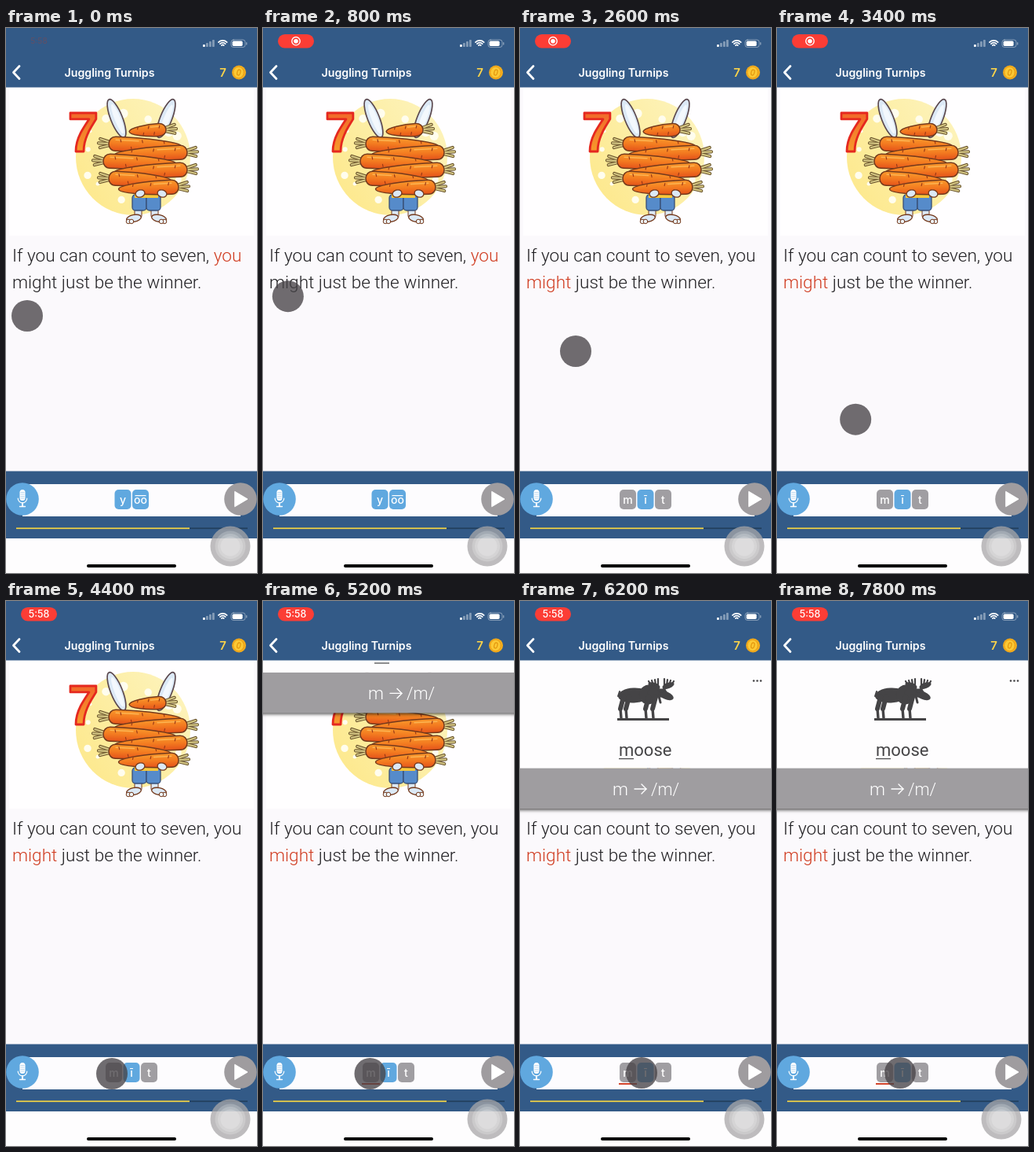
Write an HTML page with a canvas that moves like this. It is 320 by 693 pixels and loops after 8 s.

```html
<!DOCTYPE html>
<html lang="en">
<head>
<meta charset="utf-8">
<title>Reading lesson</title>
<style>
html, body { margin: 0; width: 100%; height: 100%; overflow: hidden; background: #fbf9fc; }
canvas { display: block; width: 320px; height: 693px; }
</style>
</head>
<body>
<canvas id="stage"></canvas>
<script>
const W = 320, H = 693, LOOP = 8000, STEP = 200;
const HIGHLIGHT = 1600, CLOCK = 3600, PANEL = 5100;
const BLUE = '#335a87', SKY = '#60a8df', GREY = '#a09ea2', INK = '#201f22', RED = '#d03c20';
const LINE = '#74391c', FUR = '#dce9f6', DARK = '#454446';
const canvas = document.getElementById('stage');
const ctx = canvas.getContext('2d');
const dpr = window.devicePixelRatio || 1;
canvas.width = W * dpr;
canvas.height = H * dpr;

// time, x, y of the touch pointer
const touchPath = [
  [0, 27, 366], [1400, 35, 325], [2600, 71, 411],
  [4300, 135, 601], [5000, 135, 601], [6200, 155, 600], [LOOP, 157, 600]
];

function rect(x, y, w, h, fill) {
  ctx.fillStyle = fill;
  ctx.fillRect(x, y, w, h);
}
function paint(fill, stroke, width = 1.2) {
  if (fill) { ctx.fillStyle = fill; ctx.fill(); }
  if (stroke) { ctx.strokeStyle = stroke; ctx.lineWidth = width; ctx.stroke(); }
}
function round(x, y, w, h, r, fill, stroke, width) {
  ctx.beginPath();
  ctx.roundRect(x, y, w, h, r);
  paint(fill, stroke, width);
}
function oval(x, y, rx, ry, angle, fill, stroke, width) {
  ctx.beginPath();
  ctx.ellipse(x, y, rx, ry, angle, 0, Math.PI * 2);
  paint(fill, stroke, width);
}
function disc(x, y, r, fill, stroke, width) {
  oval(x, y, r, r, 0, fill, stroke, width);
}
function line(points, stroke, width) {
  ctx.beginPath();
  for (let i = 0; i < points.length; i += 2) ctx.lineTo(points[i], points[i + 1]);
  paint(null, stroke, width);
}
function fade(x0, y0, x1, y1, ...colors) {
  const g = ctx.createLinearGradient(x0, y0, x1, y1);
  colors.forEach((c, i) => g.addColorStop(i / (colors.length - 1), c));
  return g;
}
function at(x, y, angle, flip, body) {
  ctx.save();
  ctx.translate(x, y);
  ctx.rotate(angle);
  ctx.scale(flip, 1);
  body();
  ctx.restore();
}
function text(str, x, y, font, fill, align = 'left') {
  ctx.font = font;
  ctx.textAlign = align;
  ctx.fillStyle = fill;
  ctx.fillText(str, x, y);
  return ctx.measureText(str).width;
}
const roboto = (size, weight = 300) => `${weight} ${size}px Roboto, sans-serif`;
const inter = (size, weight = 600) => `${weight} ${size}px Inter, sans-serif`;

function seeded(seed) {
  return () => (seed = seed * 16807 % 2147483647) / 2147483647;
}

// Crown at the origin, blunt tip towards +x.
function carrot(len, h) {
  for (const [width, color] of [[4.2, '#67512a'], [2.2, '#d3c583']]) {
    for (const s of [-1, 0, 1]) line([2, s * 1.5, -14 + Math.abs(s) * 2, s * 5.5], color, width);
  }
  ctx.beginPath();
  ctx.moveTo(len, 0);
  ctx.bezierCurveTo(len, -h * .3, len * .5, -h * .5, 8, -h * .5);
  ctx.bezierCurveTo(-4, -h * .5, -4, h * .5, 8, h * .5);
  ctx.bezierCurveTo(len * .5, h * .5, len, h * .3, len, 0);
  paint(fade(0, -h / 2, 0, h / 2, '#f99a2c', '#f37a20', '#e4521a'), LINE, 1.5);
  line([8, -h * .28, len * .4, -h * .26], '#fdb552', 1.6);
  for (let i = 0; i < 5; i++) {
    const x = len * (.15 + i * .15), y = h * (i % 2 ? .26 : -.24);
    line([x, y - 1.5, x + .8, y + 1.5], '#9c3a18', 1.2);
  }
}

function ear() {
  oval(0, 0, 7.5, 26, 0, FUR, '#5b494f', 1.7);
  oval(1, 1, 3.8, 20, 0, '#f3f8fd');
}

// Left half of the legs; the right half is its mirror image.
function leg() {
  round(-15, 228, 9, 13, 2, FUR, LINE, 1);
  oval(-16, 242, 9.5, 4.5, -.2, FUR, LINE, 1.4);
  for (const x of [-23, -19]) disc(x, 246, 2.8, '#edf4fb', LINE, 1);
  round(-18, 212, 18, 20, 4, '#568bca', '#384f75', 1.3);
}

function picture() {
  rect(4, 75, 312, 189, '#fffeff');
  oval(162, 164, 73, 74, 0, fade(95, 200, 225, 110, '#fde98f', '#fdf3bb'));
  const rnd = seeded(11);
  for (let i = 0; i < 14; i++) {
    const a = i * Math.PI / 7 + rnd() * .3, d = 50 + rnd() * 17;
    disc(162 + d * Math.cos(a), 164 + d * Math.sin(a), 2 + rnd() * 4.5, '#fffdee');
  }

  at(141, 115, -.38, 1, ear);
  at(204, 115, .38, 1, ear);
  for (const side of [1, -1]) at(179, 0, 0, side, leg);
  rect(164, 209, 30, 7, '#f8c83b');

  at(203, 129, -.06, -1, () => carrot(46, 16));
  for (let i = 0; i < 6; i++) {
    const side = i % 2 ? -1 : 1;
    const reach = i === 5 ? 38 : 49 + (i === 2 ? 7 : 0);
    at(181 - side * reach, 147 + i * 11, side * .04, side, () => carrot(i > 3 ? 66 + reach / 4 : 92, 18));
  }
  for (const side of [-1, 1]) oval(185 + side * 14, 210.5, 6, 4.5, side * .3, FUR, LINE, 1.3);

  text('7', 79, 156.5, '700 70px "Liberation Sans", Arial, sans-serif', fade(0, 108, 0, 157, '#f1692a', '#f79a2c'));
  ctx.strokeStyle = '#e5281f';
  ctx.lineWidth = 2.8;
  ctx.strokeText('7', 79, 156.5);
}

function moose() {
  oval(145, 120, 20, 9.5, -.05, DARK);
  oval(164, 119, 12, 12.5, .2, DARK);
  line([168, 117, 182, 117], DARK, 11);
  oval(186, 120, 10.5, 5, .4, DARK);
  line([177, 121, 179, 129], DARK, 3);
  line([127, 115, 125, 121], DARK, 2);
  for (const x of [129, 136, 161, 170]) {
    line([x + 3, 122, x - 1, 137], DARK, 6);
    line([x - 1, 137, x, 149], DARK, 3.4);
  }
  for (const side of [-1, 1]) {
    const x = 180 + side * 9;
    oval(x, 107.5, 8, 3.6, -side * .35, DARK);
    line([x, 108, 180, 115], DARK, 3);
    for (let i = 0; i < 4; i++) line([x + side * (i * 3 - 5), 107, x + side * (i * 4 - 5), 99 + i], DARK, 2.2);
  }
  rect(124, 149, 66, 3, DARK);
}

function panel(t) {
  if (t <= PANEL) return;
  const left = (1 - Math.min(1, (t - PANEL) / 500)) ** 2;
  ctx.save();
  ctx.translate(0, -190 * left);
  ctx.shadowColor = 'rgba(0,0,0,.65)';
  ctx.shadowBlur = 4 * dpr;
  ctx.shadowOffsetY = 1.5 * dpr;
  rect(-6, 212.5, 332, 51.5, '#9f9da0');
  ctx.shadowColor = 'transparent';
  rect(0, 70, W, 142.5, '#fefdfe');
  for (let i = 0; i < 3; i++) disc(298 + i * 4.5, 101.5, 1.3, DARK);
  ctx.translate(25 * left, 0);
  moose();
  text('moose', 126, 197, roboto(22, 400), DARK);
  rect(126, 200, 19, 1.2, DARK);
  text('m', 118, 247, roboto(22.5), '#fff');
  line([146, 239, 161, 239], '#fff', 1.4);
  line([155, 233, 161, 239, 155, 245], '#fff', 1.4);
  text('/m/', 185, 247, roboto(21.5), '#fff', 'center');
  ctx.restore();
}

function sentence(t) {
  const tapped = t >= HIGHLIGHT;
  const run = (str, x, y, hot) => x + text(str, x, y, roboto(22.6, hot ? 350 : 300), hot ? RED : INK);
  run('you', run('If you can count to seven, ', 8, 297), 297, !tapped);
  run(' just be the winner.', run('might', 8, 331, tapped), 331);
}

function statusPill(t) {
  if (t < STEP) {
    text('5:58', 42, 20, inter(10, 500), 'rgba(125,72,82,.55)', 'center');
    return;
  }
  round(19, 8, 46, 17.5, 9, '#fc3d35');
  if (t < CLOCK) {
    disc(42, 16.7, 5.2, null, '#fff', 1.4);
    disc(42, 16.7, 2.8, '#fff');
  } else {
    text('5:58', 42, 21.2, inter(12.4, 500), '#fff', 'center');
  }
}

function header(t) {
  const dim = 'rgba(255,255,255,.4)';
  rect(0, 0, W, 75.5, BLUE);
  statusPill(t);
  for (let i = 0; i < 4; i++) {
    const h = 3 + i * 2;
    round(251 + i * 4, 24 - h, 2.8, h, .8, i ? dim : '#fff');
  }
  for (let r = 2; r < 9; r += 2.8) {
    ctx.beginPath();
    ctx.arc(276.3, 23.5, r, -Math.PI * .75, -Math.PI * .25);
    paint(null, '#fff', 1.7);
  }
  round(287, 15, 18, 9.5, 3, null, dim, 1);
  round(288.6, 16.6, 13, 6.3, 1.6, '#fff');
  round(306, 18, 1.4, 3.6, .7, dim);

  line([17, 48.5, 9.5, 56.5, 17, 64.5], '#fff', 2.8);
  text('Juggling Turnips', 132, 61.5, inter(14.2), '#fff', 'center');
  text('7', 276.5, 62, inter(15), '#fad34a', 'center');
  disc(297, 56.5, 9, '#f5ae1c');
  oval(296.5, 56.5, 6.8, 7.3, 0, '#fcc934', '#e99b17', 1);
  oval(296.8, 56.5, 2, 3.6, .3, null, '#e4970f', 1.2);
}

function key(x, label, fill) {
  round(x, 587, 21, 25, 5, fill);
  text(label, x + 10.5, 604.5, inter(14, 500), '#fff', 'center');
}

function microphone() {
  disc(21, 599, 20.8, SKY);
  round(17.5, 587, 7, 14, 3.5, '#fff');
  for (let y = 590; y < 599; y += 2.5) rect(18.5, y, 5, .8, '#a9cdea');
  ctx.beginPath();
  ctx.arc(21, 598, 5.8, 0, Math.PI);
  paint(null, '#fff', 1.2);
  line([21, 604, 21, 608], '#fff', 2);
  line([17.5, 608.5, 24.5, 608.5], '#fff', 1.4);
}

function footer(t) {
  rect(0, 563.5, W, 85.5, BLUE);
  rect(21, 580, 278, 41, '#fdfcfe');
  if (t < HIGHLIGHT) {
    key(138.5, 'y', SKY);
    key(161, 'oo', SKY);
    rect(164.5, 594, 14, 1.2, '#fff');
  } else {
    key(127, 'm', GREY);
    key(149.5, 'ī', SKY);
    key(172, 't', GREY);
  }
  if (t > PANEL) rect(126, 613, 23, 2, '#d2452c');
  microphone();
  disc(299, 599, 20.8, '#9f9c9f');
  ctx.beginPath();
  ctx.moveTo(292, 589.5);
  ctx.lineTo(308, 599);
  ctx.lineTo(292, 608.5);
  ctx.closePath();
  paint('#fff', '#fff', 1);
  rect(13, 635.3, 295, 1.8, '#23405f');
  rect(13, 635.3, 221, 1.8, '#ecd04b');
}

function assist() {
  disc(286, 659, 25.5, 'rgba(168,167,168,.75)');
  for (const r of [19.5, 16, 12.5]) disc(286, 659, r, 'rgba(255,255,255,.2)');
}

function pointer(t) {
  const next = touchPath.findIndex(p => p[0] > t);
  const [t0, x0, y0] = touchPath[next - 1], [t1, x1, y1] = touchPath[next];
  const p = (t - t0) / (t1 - t0), e = p * p * (3 - 2 * p);
  disc(x0 + (x1 - x0) * e, y0 + (y1 - y0) * e, 20, 'rgba(70,65,70,.77)');
}

function draw(t) {
  ctx.setTransform(dpr, 0, 0, dpr, 0, 0);
  ctx.lineJoin = ctx.lineCap = 'round';
  rect(0, 0, W, H, '#fbf9fc');
  picture();
  sentence(t);
  panel(t);
  header(t);
  footer(t);
  rect(0, 649, W, 44, '#fefdfe');
  round(103, 682, 114, 4, 2, '#000');
  assist();
  pointer(t);
}

const start = performance.now();
function tick(now) {
  const t = Math.max(0, now - start) % LOOP;
  draw(Math.floor(t / STEP) * STEP);
  requestAnimationFrame(tick);
}
draw(0);
requestAnimationFrame(tick);
</script>
</body>
</html>
```
